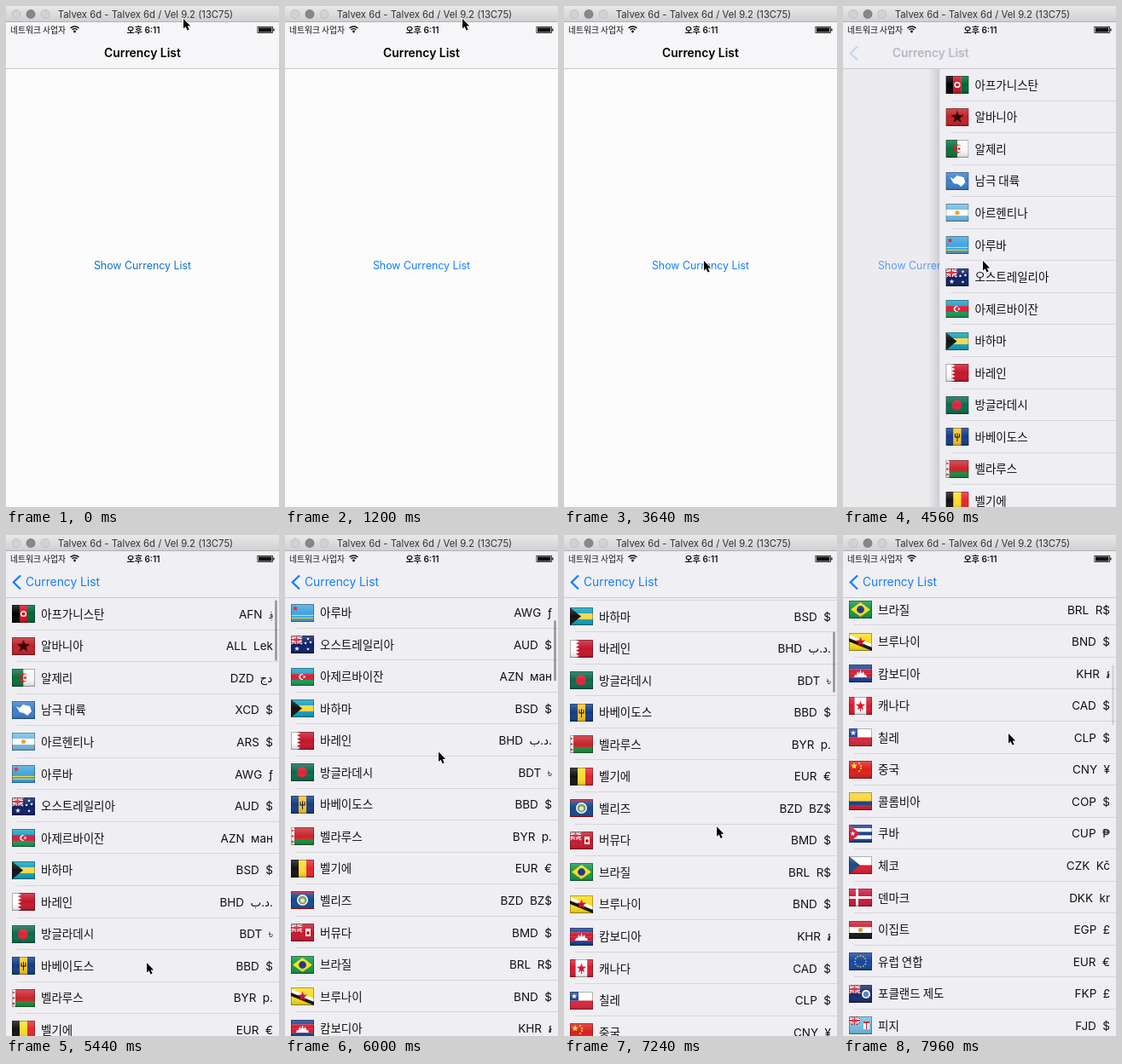
These frames come from a looping animation (320 by 588 pixels, 8000 ms). An HTML page with a canvas:

```html
<!DOCTYPE html>
<html lang="ko">
<head>
<meta charset="utf-8">
<title>Currency List</title>
<style>
html, body { margin: 0; height: 100%; overflow: hidden; background: #fcfcfd; }
canvas { display: block; }
</style>
</head>
<body>
<canvas id="stage" width="320" height="588"></canvas>
<script>
const c = document.getElementById('stage').getContext('2d');
const LOOP = 8000, W = 320, H = 588, TOP = 74, ROW = 37.55;
const FONT = 'Inter, "Noto Sans CJK KR", "DejaVu Sans", "Noto Sans", sans-serif';
const KO = '"Noto Sans CJK KR", sans-serif';
const BLUE = '#147efb', LIST = '#efeef3';

// country | code | symbol | flag drawing on a 27 x 21 field
const rows = `아프가니스탄|AFN|؋|v:000,c12,063 o:fff,13.5,10.5,3.6 o:c12,13.5,10.5,2
알바니아|ALL|Lek|h:c12027 s:300,13.5,10.5,8
알제리|DZD|دج|v:087038,f8f8f8 m:d12,14,10.5,5 s:d12,15.5,10.5,2.4
남극 대륙|XCD|$|h:3b7fcb p:fff,5,6,9,8,13,4,21,6,23,12,18,17,14,14,9,13
아르헨티나|ARS|$|h:74b9e4,fff,74b9e4 o:f0a52c,13.5,10.5,2.6
아루바|AWG|ƒ|h:45a5dc r:fd3,0,13,27,1 r:fd3,0,16,27,1 s:d12,5,5,3.4
오스트레일리아|AUD|$|h:0a1f66 u s:fff,7,15.5,3 s:fff,20,4,2 s:fff,17,9,2 s:fff,23,8,2 s:fff,20,16,2
아제르바이잔|AZN|ман|h:1a9fc4,d8203a,1a9a55 m:fff,12.5,10.5,3.2 s:fff,15.5,10.5,2
바하마|BSD|$|h:10a0bd,f9d84a,10a0bd p:111,0,0,13,10.5,0,21
바레인|BHD|د.ب.|h:c4162c z
방글라데시|BDT|৳|h:0a6a4a o:dc2338,13,10.5,6
바베이도스|BBD|$|v:123c86,f8c22a,123c86 r:111,13,6,1,10 r:111,10.5,7,1,4 r:111,15.5,7,1,4 r:111,10.5,10.5,6,1
벨라루스|BYR|p.|h:c8252d,c8252d,1a8c3c r:fff,0,0,4,21 s:c22,2,4,2 s:c22,2,10.5,2 s:c22,2,17,2
벨기에|EUR|€|v:111,fbdc2c,e4262f
벨리즈|BZD|BZ$|h:154890 r:c12,0,0,27,2 r:c12,0,19,27,2 o:fff,13.5,10.5,6.5 o:7a9d5c,13.5,10.5,5 o:dde4d8,13.5,11,2.6
버뮤다|BMD|$|h:c8182c u r:fff,17,6,6,9 o:c12,20,11,2
브라질|BRL|R$|h:129647 p:fcdc1e,2,10.5,13.5,2,25,10.5,13.5,19 o:173a84,13.5,10.5,4.4
브루나이|BND|$|h:f9dc1c p:fff,0,2,27,13,27,17,0,6 p:111,0,6,27,17,27,21,0,10 s:c12,13.5,10.5,6
캄보디아|KHR|៛|h:123f98,d3182e,d3182e,123f98 p:fff,6,15,7,12,9,12,10,8,12,11,13.5,6,15,11,17,8,18,12,20,12,21,15
캐나다|CAD|$|v:d8192e,fff,fff,d8192e s:d12,13.5,10.5,6 r:d12,13,11,1,6
칠레|CLP|$|h:fff,d8253a r:1b429b,0,0,10,10.5 s:fff,5,5.3,3.4
중국|CNY|¥|h:dc1e1e s:fe3,6,6,4 s:fe3,12,3,1.5 s:fe3,14,6,1.5 s:fe3,14,9,1.5 s:fe3,12,12,1.5
콜롬비아|COP|$|h:fad52a,fad52a,173f93,cc1d30
쿠바|CUP|₱|h:174194,fff,174194,fff,174194 p:d0203a,0,0,13,10.5,0,21 s:fff,4.5,10.5,3
체코|CZK|Kč|h:fff,d8202e p:1b4a86,0,0,13,10.5,0,21
덴마크|DKK|kr|h:cc1739 r:fff,8,0,3,21 r:fff,0,9,27,3
이집트|EGP|£|h:cd1b30,fff,161616 o:c9a13a,13.5,10.5,2.6
유럽 연합|EUR|€|h:14479f e
포클랜드 제도|FKP|£|h:152a6a u o:fff,20,11,5 o:4f86bd,20,11,3.2
피지|FJD|$|h:72bde0 u r:fff,17,6,7,9 r:d12,17,6,7,2 r:d12,20,6,1,9`
  .split('\n').map(line => line.split('|'));

function poly(pts) {
  c.beginPath();
  for (let i = 0; i < pts.length; i += 2) c.lineTo(pts[i], pts[i + 1]);
  c.closePath();
}
function star(x, y, r) {
  const pts = [];
  for (let i = 0; i < 10; i++) {
    const a = i * Math.PI / 5, q = i % 2 ? r * .42 : r;
    pts.push(x + q * Math.sin(a), y - q * Math.cos(a));
  }
  poly(pts);
  c.fill();
}
function disc(x, y, r) {
  c.beginPath();
  c.arc(x, y, r, 0, 7);
  c.fill();
}
const draw = {
  r: (x, y, w, h) => c.fillRect(x, y, w, h),
  o: disc,
  s: star,
  p(...pts) { poly(pts); c.fill(); },
  m(x, y, r) {
    c.beginPath();
    c.arc(x, y, r, .6, -.6);
    c.arc(x + r * .3, y, r * .77, -.8, .8, true);
    c.fill();
  },
  z() {
    c.fillStyle = '#fff';
    c.fillRect(0, 0, 7, 21);
    for (let y = 0; y < 21; y += 4.2) { poly([7, y, 11, y + 2.1, 7, y + 4.2]); c.fill(); }
  },
  e() {
    c.fillStyle = '#fd3';
    for (let i = 0; i < 12; i++) star(13.5 + 6.5 * Math.sin(i * Math.PI / 6), 10.5 + 6.5 * Math.cos(i * Math.PI / 6), 1.3);
  },
  u() {
    c.fillStyle = '#1c3478';
    c.fillRect(0, 0, 13, 10);
    for (const [color, diag, cross] of [['#fff', 2.2, 4], ['#d3202f', .8, 2]]) {
      c.strokeStyle = color;
      c.lineWidth = diag;
      c.beginPath();
      c.moveTo(0, 0); c.lineTo(13, 10);
      c.moveTo(13, 0); c.lineTo(0, 10);
      c.stroke();
      c.fillStyle = color;
      c.fillRect(6.5 - cross / 2, 0, cross, 10);
      c.fillRect(0, 5 - cross / 2, 13, cross);
    }
  }
};

function flag(spec, x, y) {
  c.save();
  c.translate(x, y);
  c.beginPath();
  c.rect(0, 0, 27, 21);
  c.clip();
  for (const part of spec.split(' ')) {
    const [op, rest = ''] = part.split(':'), args = rest.split(',');
    if (op === 'h' || op === 'v') {
      args.forEach((color, i) => {
        c.fillStyle = '#' + color;
        const n = args.length;
        if (op === 'h') c.fillRect(0, i * 21 / n, 27, 21 / n + .1);
        else c.fillRect(i * 27 / n, 0, 27 / n + .1, 21);
      });
    } else {
      if (rest) c.fillStyle = '#' + args[0];
      draw[op](...args.slice(1).map(Number));
    }
  }
  const gloss = c.createLinearGradient(0, 0, 0, 21);
  gloss.addColorStop(0, 'rgba(255,255,255,.22)');
  gloss.addColorStop(.5, 'rgba(255,255,255,0)');
  gloss.addColorStop(1, 'rgba(0,0,0,.18)');
  c.fillStyle = gloss;
  c.fillRect(0, 0, 27, 21);
  c.strokeStyle = 'rgba(0,0,0,.3)';
  c.lineWidth = 1;
  c.strokeRect(.5, .5, 26, 20);
  c.restore();
}

function text(str, x, y, font, color, align = 'left', alpha = 1) {
  c.globalAlpha = alpha;
  c.font = font;
  c.fillStyle = color;
  c.textAlign = align;
  c.fillText(str, x, y);
  c.globalAlpha = 1;
}

const clamp = v => Math.max(0, Math.min(1, v));

// keys: [time, ease-out power, ...values]
function at(keys, t) {
  const i = keys.findIndex(k => k[0] > t);
  if (i === 0) return keys[0].slice(2);
  if (i < 0) return keys[keys.length - 1].slice(2);
  const a = keys[i - 1], b = keys[i];
  const u = 1 - (1 - (t - a[0]) / (b[0] - a[0])) ** b[1];
  return a.slice(2).map((v, j) => v + (b[j + 2] - v) * u);
}
const pointer = [
  [1640, 1, 208, 15], [1720, 1, 200, 70], [1960, 1, 183, 205], [2080, 2, 151, 221],
  [2400, 1, 151, 221], [3000, 2, 164, 299], [4700, 1, 164, 299], [5300, 2, 165, 502],
  [5640, 1, 165, 502], [6000, 1, 180, 255], [6120, 2, 181, 230], [6300, 1, 181, 230],
  [6960, 2, 177, 415], [7080, 1, 177, 415], [7240, 1, 179, 343], [7400, 1, 194, 233]
];
const scroll = [
  [5720, 1, 0], [6000, 1, 189], [6080, 2, 210], [6800, 3, 225],
  [7080, 1, 225], [7240, 1, 297], [7400, 1, 403], [7820, 2, 606]
];

function list(x, offset) {
  if (x >= W) return;
  const shade = c.createLinearGradient(x - 14, 0, x, 0);
  shade.addColorStop(0, 'rgba(0,0,0,0)');
  shade.addColorStop(1, 'rgba(0,0,0,.13)');
  c.fillStyle = shade;
  c.fillRect(x - 14, TOP, 14, H);
  c.fillStyle = LIST;
  c.fillRect(x, TOP, W, H);
  rows.forEach(([name, code, sign, spec], i) => {
    const y = TOP + i * ROW - offset, mid = y + ROW / 2;
    if (y > H || y + ROW < TOP) return;
    flag(spec, x + 7, Math.round(mid - 10.5));
    text(name, x + 41, mid + 5, '13.5px ' + KO, '#111');
    text(sign, x + 313, mid + 5, '13.5px ' + FONT, '#111', 'right');
    const w = c.measureText(sign).width;
    text(code, x + 313 - w - 7.5, mid + 5, '13.5px ' + FONT, '#111', 'right');
    c.fillStyle = '#d6d5da';
    c.fillRect(x + 13, Math.round(y + ROW) - 1, W, 1);
  });
}

function statusBar() {
  text('네트워크 사업자', 5, 31.5, '9.75px ' + KO, '#111');
  text('오후 6:11', 161, 31.5, '600 10px ' + FONT, '#111', 'center');
  c.strokeStyle = c.fillStyle = '#111';
  c.lineWidth = 1.4;
  for (const r of [4.2, 7]) {
    c.beginPath();
    c.arc(80.5, 31, r, -2.36, -.78);
    c.stroke();
  }
  disc(80.5, 30, 1.4);
  c.lineWidth = .8;
  c.strokeRect(294.9, 24.4, 17.6, 7.2);
  c.fillRect(296, 25.4, 15.4, 5.2);
  c.fillRect(313.2, 26.6, 1.3, 2.8);
}

function navBar(p, light) {
  c.fillStyle = light ? '#f6f5f8' : '#f0eff3';
  c.fillRect(0, 19, W, TOP - 19);
  c.fillStyle = '#c9c8cc';
  c.fillRect(0, TOP - 1, W, 1);
  statusBar();
  const shift = 92 * p * (p < 1 ? .9 + .1 * p : 1);
  text('Currency List', 115 - shift, 60, '600 13.9px ' + FONT, '#000', 'left', clamp(1 - p * 1.22));
  const shown = clamp((p - .62) / .38);
  text('Currency List', 115 - shift, 60, '13.8px ' + FONT, BLUE, 'left', shown);
  c.globalAlpha = clamp((p - .55) / .45);
  c.strokeStyle = BLUE;
  c.lineWidth = 2.3;
  c.beginPath();
  c.moveTo(17, 47.5);
  c.lineTo(8.8, 55.5);
  c.lineTo(17, 63.5);
  c.stroke();
  c.globalAlpha = 1;
}

function titleBar() {
  const g = c.createLinearGradient(0, 0, 0, 19);
  g.addColorStop(0, '#e9e7e9');
  g.addColorStop(1, '#d0ced0');
  c.fillStyle = g;
  c.fillRect(0, 0, W, 19);
  c.fillStyle = '#b4b2b4';
  c.fillRect(0, 18, W, 1);
  [12, 29, 46].forEach((x, i) => {
    c.fillStyle = i === 1 ? '#7d7b7d' : '#bfbdbf';
    disc(x, 9.5, 5.4);
    c.fillStyle = i === 1 ? '#89878a' : '#d3d1d3';
    disc(x, 9.5, 4.6);
  });
  text('Talvex 6d - Talvex 6d / Vel 9.2 (13C75)', 163.5, 14, '11.3px ' + FONT, '#333', 'center');
}

function arrow(x, y) {
  c.save();
  c.translate(x, y);
  poly([0, 0, 0, 11.5, 2.6, 9.2, 4.6, 13.6, 6.6, 12.7, 4.7, 8.5, 8.2, 8.4]);
  c.lineWidth = 1.6;
  c.strokeStyle = '#fff';
  c.stroke();
  c.fillStyle = '#000';
  c.fill();
  c.restore();
}

function paint(t) {
  // critically damped push to the list
  const k = Math.max(0, t - 4385) / 80, rest = (1 + k) * Math.exp(-k);
  const p = rest < .004 ? 1 : 1 - rest;
  const [offset] = at(scroll, t);

  c.fillStyle = '#fcfcfd';
  c.fillRect(0, 0, W, H);
  if (p > 0) {
    c.fillStyle = `rgba(228,228,232,${clamp(p)})`;
    c.fillRect(0, TOP, W, H);
  }
  const press = t < 4160 ? 1 : .3 + .7 * clamp((t - 4400) / 300);
  text('Show Currency List', 160 - 96 * p, 308.5, '12.4px ' + FONT, t < 860 ? '#0d72cf' : BLUE, 'center', press);
  list(W * (1 - p), offset);

  const bar = clamp((t - 4850) / 150) * clamp((8040 - t) / 260);
  c.fillStyle = `rgba(0,0,0,${.4 * bar})`;
  c.beginPath();
  c.roundRect(315.3, 76.5 + offset * .125, 2.4, 71, 1.2);
  c.fill();

  navBar(p, p === 0);
  titleBar();
  arrow(...at(pointer, t));
}

const start = performance.now();
(function frame() {
  paint((performance.now() - start) % LOOP);
  requestAnimationFrame(frame);
})();
</script>
</body>
</html>
```
